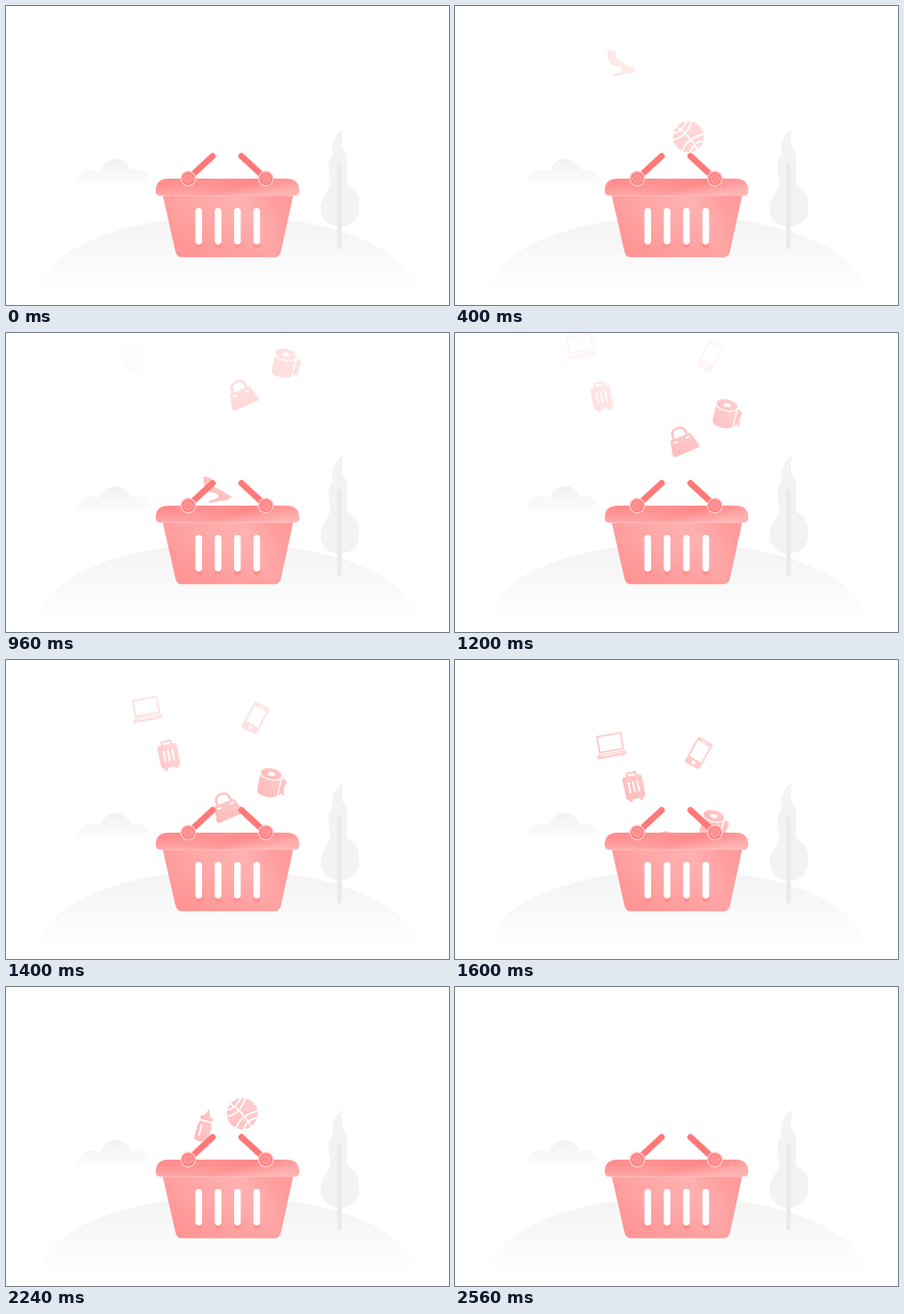
Recreate the animation shown at these times as an HTML page. Size 497x336 px, loop 2.76 s.

```html
<!DOCTYPE html>
<html lang="en">
<head>
<meta charset="utf-8">
<title>Basket</title>
<style>
  html, body { margin: 0; width: 100%; height: 100%; overflow: hidden; background: #fff; }
  svg { display: block; width: 497px; height: 336px; }
  .item { fill: url(#pink); stroke: none; opacity: 0; }
  .item .w { fill: #fff; }
  .item .l { fill: none; stroke: #fff; stroke-width: 2; stroke-linecap: round; }
  .item .p { fill: none; stroke: #ffa6a6; stroke-width: 2; }
</style>
</head>
<body>
<svg viewBox="0 0 497 336">
  <defs>
    <linearGradient id="pink" x1="0" y1="1" x2="1" y2="0">
      <stop offset="0" stop-color="#ff9999"/><stop offset="1" stop-color="#ffb2b2"/>
    </linearGradient>
    <linearGradient id="hill" gradientUnits="userSpaceOnUse" x1="0" y1="244" x2="0" y2="322">
      <stop offset="0" stop-color="#f4f4f4"/><stop offset="1" stop-color="#fff"/>
    </linearGradient>
    <linearGradient id="cloud" gradientUnits="userSpaceOnUse" x1="0" y1="169" x2="0" y2="205">
      <stop offset="0" stop-color="#f0f0f0"/><stop offset="1" stop-color="#fff"/>
    </linearGradient>
    <linearGradient id="rim" x1="0" y1="0" x2="1" y2=".35">
      <stop offset="0" stop-color="#ff8e8e"/><stop offset=".45" stop-color="#ff9191"/>
      <stop offset=".65" stop-color="#ff8888"/><stop offset="1" stop-color="#ffa5a5"/>
    </linearGradient>
    <linearGradient id="rimGlow" x1="0" y1="0" x2="0" y2="1">
      <stop offset=".3" stop-color="#fff" stop-opacity="0"/><stop offset="1" stop-color="#fff" stop-opacity=".2"/>
    </linearGradient>
    <linearGradient id="body" gradientUnits="userSpaceOnUse" x1="185" y1="282" x2="300" y2="212">
      <stop offset="0" stop-color="#ff9494"/><stop offset=".4" stop-color="#ffa6a6"/>
      <stop offset=".75" stop-color="#ffb0b0"/><stop offset="1" stop-color="#ff9b9b"/>
    </linearGradient>
    <linearGradient id="foot" gradientUnits="userSpaceOnUse" x1="0" y1="240" x2="0" y2="282">
      <stop offset="0" stop-color="#ff8c8c" stop-opacity="0"/><stop offset="1" stop-color="#ff8c8c" stop-opacity=".4"/>
    </linearGradient>
    <clipPath id="above"><rect width="497" height="194"/></clipPath>
    <clipPath id="sky"><rect width="497" height="205"/></clipPath>
    <g id="hinge">
      <path d="M0 0L27.3 -25.2" stroke="#ff7878" stroke-width="7" stroke-linecap="round"/>
      <circle r="9" fill="#ffc4c4"/>
      <circle r="7.3" fill="#ff7d7d"/>
      <circle r="5" fill="#ff8f8f" stroke="#ffabab" stroke-width=".8"/>
    </g>
  </defs>

  <rect width="497" height="336" fill="#fff"/>
  <path d="M39 322A210 86 0 0 1 459 322Z" fill="url(#hill)"/>
  <g fill="url(#cloud)" clip-path="url(#sky)">
    <path d="M79 205C79 190 87 184 96 184C100 184 103 185 106 186A17.5 17.5 0 0 1 140 185C153 180 163 191 164 205Z"/>
  </g>
  <path d="M378 138C368 144 364 157 367 166C360 174 361 184 364 194C365 208 353 212 353 229C354 241 363 248 374 248C386 248 395 241 396 230C397 214 395 209 386 203C379 198 384 192 383 181C382 174 384 170 381 164C375 158 377 148 378 138Z" fill="#f3f3f3"/>
  <path d="M374 178V271" stroke="#eaeaea" stroke-width="5" stroke-linecap="round"/>

  <g id="items" clip-path="url(#above)"></g>

  <g id="basket">
    <path id="tub" d="M176 212H322L308 276Q306.5 282 301 282H197Q192 282 190.5 276Z" fill="url(#body)"/>
    <path d="M176 212H322L308 276Q306.5 282 301 282H197Q192 282 190.5 276Z" fill="url(#foot)" stroke="#ff9292" stroke-width=".6"/>
    <g id="slots"></g>
    <path d="M182 194H315Q329 194 329 208Q329 213 324 213H173Q168 213 168 208Q168 194 182 194Z" fill="url(#rim)"/>
    <path d="M182 194H315Q329 194 329 208Q329 213 324 213H173Q168 213 168 208Q168 194 182 194Z" fill="url(#rimGlow)"/>
    <path d="M176 213H322" stroke="#ffc4c4" stroke-width=".9"/>
    <use href="#hinge" x="204.5" y="194"/>
    <use href="#hinge" transform="translate(291.5 194) scale(-1 1)"/>
  </g>
</svg>
<script>
const LOOP = 2760, STEP = 40;

// Shapes are drawn upright around their own centre.
const shapes = {
  shoe: `<path d="M-15 -12Q-14 -14 -6 -10.5L-5.500 -5Q-3 0 3 2L17 10Q12 15 4 14.500L-8 17L-9 15L1 11.500L2 9L-1 6L-11 4Q-16 -4 -15 -12Z"/>`,
  bag: `<path class="p" style="stroke-width:2.600" d="M-8 -4V-8Q-8 -16 0 -16T8 -8V-4"/>
    <path d="M-12 -6H12L16 10Q16 13 13 13H-13Q-16 13 -16 10Z"/>
    <path class="l" d="M-9 -2H-6M6 -2H9"/>`,
  roll: `<path d="M-13 -9V10Q-13 16 -1 16T11 10V-9Z"/><ellipse cx="-1" cy="-10" rx="12" ry="6.500"/>
    <path class="l" style="stroke-width:1.300" d="M-13 -9C-13 -2 11 -2 11 -9V13"/>
    <ellipse class="w" cx="-1" cy="-10" rx="4" ry="2.200"/>
    <path d="M12 -8Q18 -7 18 -4L16 2L18 11L14 9L11.500 12Z"/>`,
  luggage: `<path class="p" d="M-5 -11V-15.500H5V-11"/>
    <rect x="-11" y="-12" width="22" height="26" rx="3"/>
    <path d="M-8 13H-4V16.500H-8ZM4 13H8V16.500H4Z"/>
    <path class="l" d="M-5 -5V6M0 -5V6M5 -5V6"/>`,
  laptop: `<rect x="-14" y="-13" width="29" height="20" rx="1.500"/>
    <rect class="w" x="-12" y="-11" width="25" height="16"/>
    <path d="M-15 8H16L17 12Q17 13 15 13H-15Q-17 13 -17 12Z"/>
    <path class="l" style="stroke-width:1" d="M-12 10H12"/>`,
  phone: `<rect x="-9.500" y="-16.500" width="19" height="33" rx="3"/>
    <rect class="w" x="-7.500" y="-12" width="15" height="20"/>
    <circle class="w" cy="12.300" r="2.300"/><path class="l" style="stroke-width:1" d="M-3 -14.300H3"/>`,
  bottle: `<path d="M-3.500 -11Q-3 -14 -1.500 -15Q-1 -19 0 -19T1.500 -15Q3 -14 3.500 -11Z"/>
    <rect x="-7" y="-11" width="14" height="4.500" rx="1.500"/>
    <path d="M-6 -5H6Q8 -2 8 1V15Q8 18 5 18H-5Q-8 18 -8 15V1Q-8 -2 -6 -5Z"/>
    <path class="l" d="M-3.500 0V11"/>`,
  ball: `<circle r="17.500"/><path class="l" style="stroke-width:1.800"
    d="M-17 3Q-2 0 3 -17M-7 16Q-1 1 17 -3M-13 -11Q0 -3 10 14M-17 -4Q-8 -5 -2 -17M2 17Q6 5 17 5"/>`
};

// name, time, x, y at that time, speed per ms, tilt, opacity at that time
const drops = [
  ["ball",     400, 262, 147, -.034, .222,   0, .45],
  ["shoe",     720, 215, 126,  .09,  .2,     0, .6],
  ["bag",     1200, 255, 122, -.04,  .218, -23, .66],
  ["roll",    1200, 304,  91, -.037, .236,  12, .6],
  ["luggage", 1200, 164.5, 71.5, .09, .176, -12, .3],
  ["laptop",  1600, 174,  96,  .084, .203, -10, .55],
  ["phone",   1600, 273.5, 104.5, -.032, .197, 29, .55],
  ["bottle",  1920, 194,  80,  .09,  .238,  15, .33],
  ["ball",    1920, 276,  72, -.034, .22,    0, .26]
];
const FADE = .0011, MAX = .68;

const make = (name, parent) =>
  parent.appendChild(document.createElementNS("http://www.w3.org/2000/svg", name));

const layer = document.getElementById("items");
const nodes = drops.map(([name]) => {
  const g = make("g", layer);
  g.setAttribute("class", "item");
  g.innerHTML = shapes[name];
  return g;
});

document.getElementById("slots").innerHTML = [212.5, 234.2, 255.9, 277.6].map(x =>
  `<rect x="${x}" y="231" width="7.500" height="41" rx="3.700" fill="#ff8f8f"/>
   <rect x="${x}" y="227" width="7.500" height="41" rx="3.700" fill="#fff"/>`).join("");

function draw(now) {
  const t = Math.floor(now % LOOP / STEP) * STEP;
  drops.forEach(([, at, x, y, vx, vy, tilt, alpha], i) => {
    const d = t - at;
    const shown = t >= 80 && t < 2560;
    nodes[i].style.opacity = shown ? Math.max(0, Math.min(MAX, alpha + FADE * d)) : 0;
    nodes[i].setAttribute("transform", `translate(${x + vx * d} ${y + vy * d}) rotate(${tilt})`);
  });
}

const start = performance.now();
function tick() {
  draw(performance.now() - start);
  requestAnimationFrame(tick);
}
tick();
</script>
</body>
</html>
```
